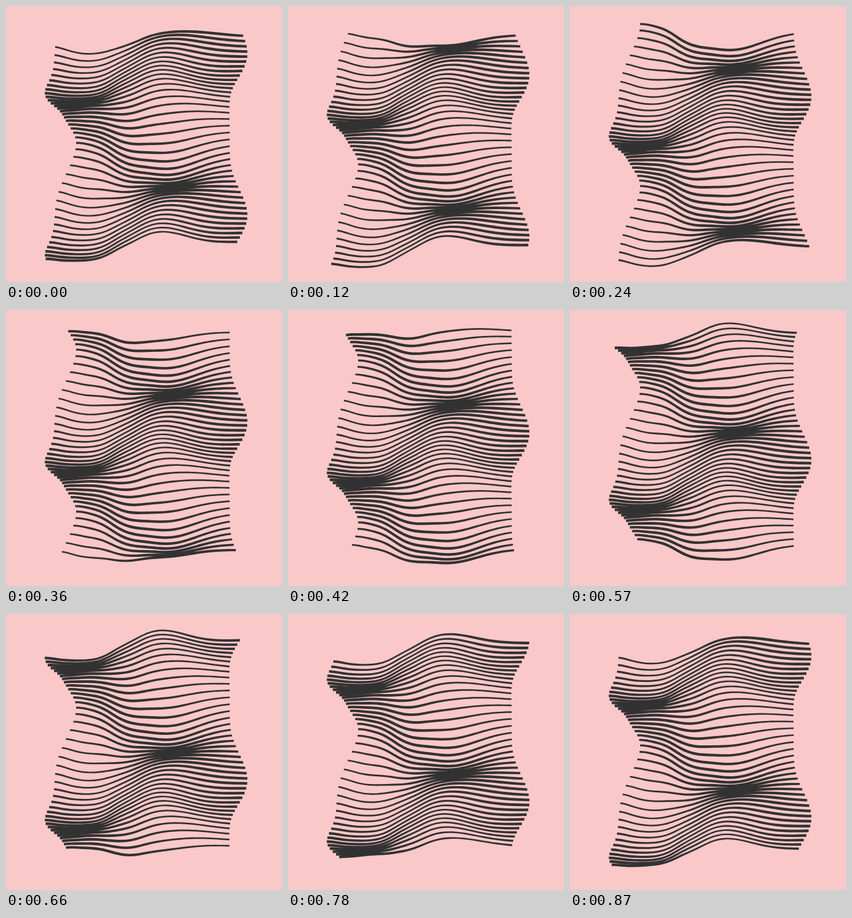
An HTML page that plays this animation: 500 px wide and 500 px high, repeating every 900 ms.

```html
<!DOCTYPE html>
<html lang="en">
<head>
<meta charset="utf-8">
<title>Rippling lines</title>
<style>
html, body { margin: 0; width: 100%; height: 100%; overflow: hidden; background: #fbc8c9; }
svg { display: block; width: 100%; height: 100%; }
</style>
</head>
<body>
<svg viewBox="0 0 500 500">
  <rect width="500" height="500" fill="#fbc8c9"/>
  <path id="lines" fill="#333232"/>
</svg>
<script>
const LINES = 40, STEPS = 30, STEP_MS = 30, GAP = 9.78, SEGMENTS = 44;
const TAU = 2 * Math.PI;

const wave = (angle, shift) => Math.cos(angle - shift * Math.PI / 180);
const bump = (x, centre, width) => Math.exp(-(((x - centre) / width) ** 2));
const fall = (x, centre, width) => 1 / (1 + Math.exp((x - centre) / width));

// The two ends of a line sway sideways, each with its own rhythm.
const leftEnd = a => 97 + 24.6 * wave(a, 101) + 3 * wave(2 * a, -124) + 4.3 * wave(3 * a, -111);
const rightEnd = a => 416.5 + 16.1 * wave(a, -39) + 4.8 * wave(2 * a, -82);

// Height: a common sway, a swell on the left and a counter-swell in the middle.
function height(x, a, left) {
  const side = fall(x, 190, 13);
  const rest = 47.3 + 17 * fall(x, 243, 15) - 4 * bump(x, left, 25);
  const sway = (8 + 10.5 * bump(x, 153, 58)) * Math.cos(a);
  const swell = (25 * bump(x, 286, 71) - 23.3 * side) * Math.sin(a);
  const twice = (2.5 * side - 9.3 * bump(x, 322, 79)) * Math.cos(2 * a)
    - 1.8 * fall(x, 290, 20) * Math.sin(2 * a);
  return rest + sway + swell + twice + 2.6 * bump(x, 150, 45) * wave(3 * a, 50);
}

// Line weight: a broad wave that runs across the sheet.
const weight = (x, a) => 3.9 + wave(a, 180 - 0.87 * (x - 150));

function ribbon(i, step) {
  const a = TAU * (step - i) / STEPS;
  const left = leftEnd(a), right = rightEnd(a);
  const upper = [], lower = [];
  for (let k = 0; k <= SEGMENTS; k++) {
    const x = left + (right - left) * k / SEGMENTS;
    const y = height(x, a, left) + i * GAP;
    const slope = (height(x + 1, a, left) - height(x - 1, a, left)) / 2;
    const half = weight(x, a) / 2 / Math.hypot(1, slope);
    const point = s => `${(x - s * half * slope).toFixed(2)} ${(y + s * half).toFixed(2)}`;
    upper.push(point(-1));
    lower.unshift(point(1));
  }
  return `M${upper.concat(lower).join("L")}Z`;
}

const path = document.getElementById("lines");
let shown = -1;

function draw(ms) {
  const step = Math.floor(ms / STEP_MS) % STEPS;
  if (step === shown) return;
  shown = step;
  let d = "";
  for (let i = 0; i < LINES; i++) d += ribbon(i, step);
  path.setAttribute("d", d);
}

const start = performance.now();
function tick() {
  draw(performance.now() - start);
  requestAnimationFrame(tick);
}
tick();
</script>
</body>
</html>
```
